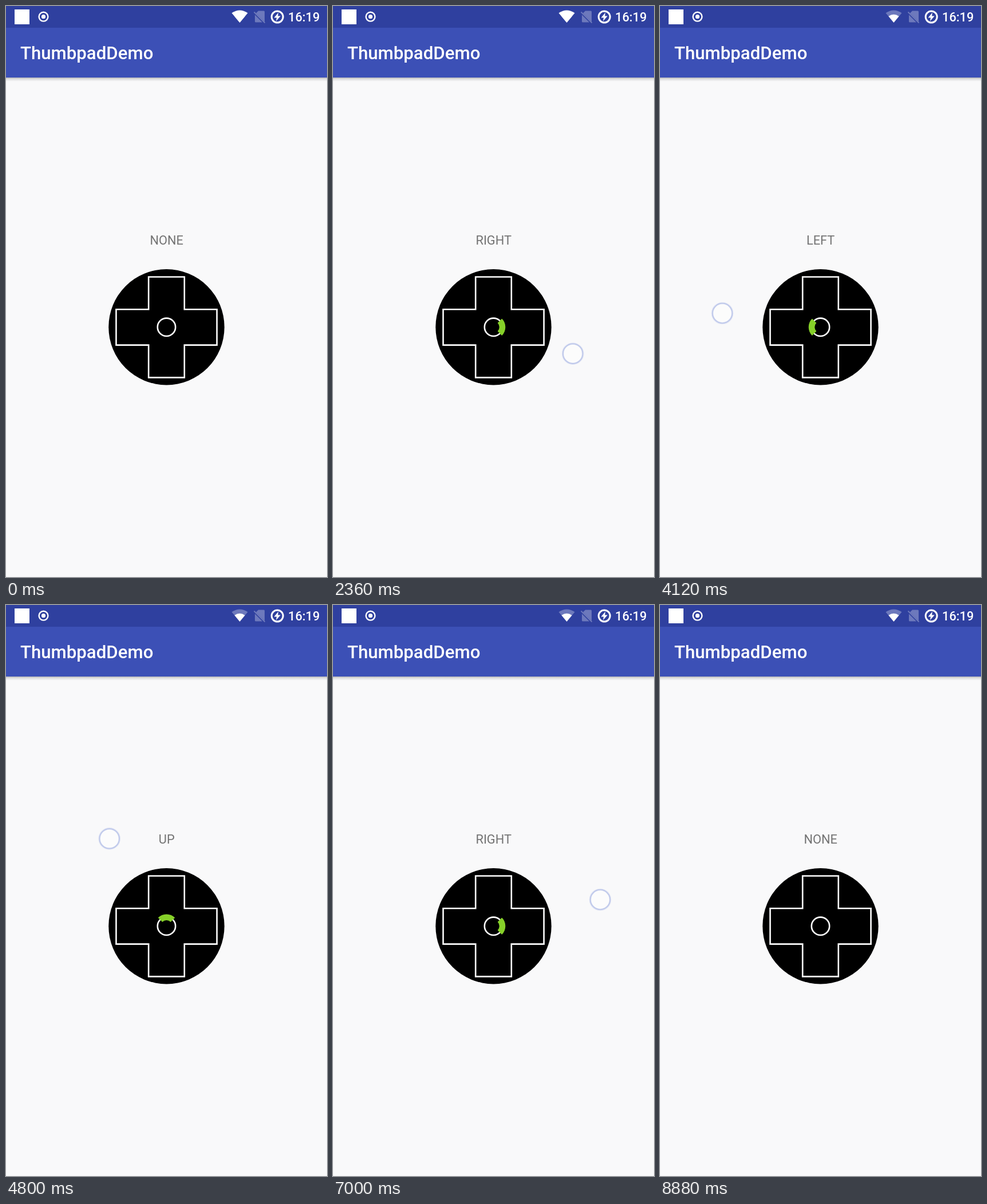
Animation of 561 by 998 pixels, one loop 8.92 s. Source, as an HTML page:

```html
<!DOCTYPE html>
<html lang="en">
<head>
<meta charset="utf-8">
<title>Direction pad</title>
<style>
  html, body { margin: 0; width: 100%; height: 100%; overflow: hidden; background: #f9f9fa; }
  svg { display: block; width: 100vw; height: 100vh; }
  text { font-family: Roboto, "Noto Sans", sans-serif; }
</style>
</head>
<body>
<svg viewBox="0 0 561 998" preserveAspectRatio="none">
  <defs>
    <linearGradient id="shade" x1="0" y1="0" x2="0" y2="1">
      <stop offset="0" stop-color="#000" stop-opacity=".27"/>
      <stop offset=".4" stop-color="#000" stop-opacity=".1"/>
      <stop offset="1" stop-color="#000" stop-opacity="0"/>
    </linearGradient>
  </defs>
  <rect width="561" height="998" fill="#f9f9fa"/>

  <!-- app bar -->
  <rect y="125" width="561" height="7" fill="url(#shade)"/>
  <rect width="561" height="125" fill="#3c50b6"/>
  <text x="25" y="93" font-size="31.2" font-weight="500" fill="#fff">ThumbpadDemo</text>

  <!-- status bar -->
  <rect width="561" height="38" fill="#2f409f"/>
  <rect x="15" y="6" width="26" height="26" fill="#fff"/>
  <circle cx="65.5" cy="18.7" r="7.9" fill="none" stroke="#fff" stroke-width="2.4"/>
  <circle cx="65.5" cy="18.7" r="3.6" fill="#fff"/>
  <path id="wifi" d="M408.5 29L394.5 12.3Q408.5 2.8 422.5 12.3Z" fill="#fff"/>
  <path d="M408.5 29L399.4 18Q408.5 11.6 417.6 18Z" fill="#fff"/>
  <path d="M441 8.500H450.500Q452 8.500 452 10V27.500L437 12.500ZM435 15.500L448 28.500H436.500Q435 28.500 435 27Z" fill="#fff" opacity=".3"/>
  <path d="M433.500 10.500L452.500 29.500" stroke="#fff" stroke-width="1.8" opacity=".3"/>
  <circle cx="474.200" cy="19" r="10" fill="none" stroke="#fff" stroke-width="3"/>
  <path d="M476 11.500L468.500 20.500H473L472 26.500L479.800 17.500H475.200Z" fill="#fff"/>
  <text x="493" y="27" font-size="21.8" font-weight="500" fill="#fff">16:19</text>

  <!-- pad -->
  <text id="label" x="280.7" y="416.5" font-size="21.8" text-anchor="middle" fill="#737373">NONE</text>
  <circle cx="280.5" cy="561.2" r="101.2" fill="#000"/>
  <g fill="none" stroke="#fff" stroke-width="2.6">
    <path d="M249.200 473.500H311.800V530.200H368.600V592.600H311.800V649.400H249.200V592.600H192.500V530.200H249.200Z"/>
    <circle cx="280.5" cy="561.3" r="15.7"/>
  </g>
  <path id="arc" d="M10.960 -10.960A15.500 15.500 0 0 1 10.960 10.960" fill="none" stroke="#86d029" stroke-width="10.6"/>

  <g id="finger">
    <circle r="17.3" fill="#fff" fill-opacity=".5"/>
    <circle r="17.5" fill="none" stroke="#b4c0e8" stroke-opacity=".35" stroke-width="3.6"/>
    <circle r="17.3" fill="none" stroke="#b4c0e8" stroke-opacity=".8" stroke-width="1.8"/>
  </g>
</svg>
<script>
const LOOP = 8920, STEP = 40;
const TOUCH = 1040, RELEASE = 8720, WIFI_DIMS = 2840;
const CENTER = { x: 280.5, y: 561.3 }, DEAD_ZONE = 40;
const DIRECTIONS = ["RIGHT", "DOWN", "LEFT", "UP"];

// Finger path: [time, x, y]
const PATH = [
  [1040, 281, 561], [1480, 281, 561], [1680, 416, 551], [2000, 420, 564],
  [2400, 419, 614], [2720, 345, 682], [3040, 251.5, 694], [3320, 170, 680],
  [3700, 112, 610], [4120, 109, 537], [4700, 160, 425], [5160, 286, 366],
  [5560, 330.5, 374], [6080, 404, 414], [6500, 450, 460], [7000, 467, 515],
  [7200, 470, 547], [7560, 442, 626], [7920, 366, 687], [8360, 300, 724],
  [8720, 300, 725]
];

const $ = id => document.getElementById(id);
const label = $("label"), arc = $("arc"), finger = $("finger"), wifi = $("wifi");

function slope(i, axis) {
  if (i === 0 || i === PATH.length - 1) return 0;
  const a = PATH[i - 1], b = PATH[i], c = PATH[i + 1];
  const before = (b[axis] - a[axis]) / (b[0] - a[0]);
  const after = (c[axis] - b[axis]) / (c[0] - b[0]);
  // Harmonic mean keeps the curve from overshooting its turning points.
  return before * after > 0 ? 2 * before * after / (before + after) : 0;
}

function pathAt(time, axis) {
  const next = PATH.findIndex(p => p[0] >= time);
  if (next < 1) return PATH[0][axis];
  const i = next - 1, a = PATH[i], b = PATH[next];
  const span = b[0] - a[0], u = (time - a[0]) / span;
  const ease = u * u * (3 - 2 * u);
  return a[axis] + (b[axis] - a[axis]) * ease
    + span * u * (1 - u) * ((1 - u) * slope(i, axis) - u * slope(next, axis));
}

function directionOf(x, y) {
  const dx = x - CENTER.x, dy = y - CENTER.y;
  if (Math.hypot(dx, dy) < DEAD_ZONE) return -1;
  return (Math.round(Math.atan2(dy, dx) / (Math.PI / 2)) + 4) % 4;
}

function render(time) {
  const touching = time >= TOUCH && time < RELEASE;
  let direction = -1;
  if (touching) {
    const x = pathAt(time, 1), y = pathAt(time, 2);
    direction = directionOf(x, y);
    finger.setAttribute("transform", `translate(${x} ${y})`);
  }
  finger.style.display = touching ? "" : "none";
  arc.style.display = direction < 0 ? "none" : "";
  arc.setAttribute("transform", `translate(${CENTER.x} ${CENTER.y}) rotate(${direction * 90})`);
  label.textContent = DIRECTIONS[direction] || "NONE";
  wifi.setAttribute("opacity", time < WIFI_DIMS ? 1 : 0.3);
}

const start = performance.now();
function tick() {
  const time = (performance.now() - start) % LOOP;
  render(Math.floor(time / STEP) * STEP);
  requestAnimationFrame(tick);
}
tick();
</script>
</body>
</html>
```
